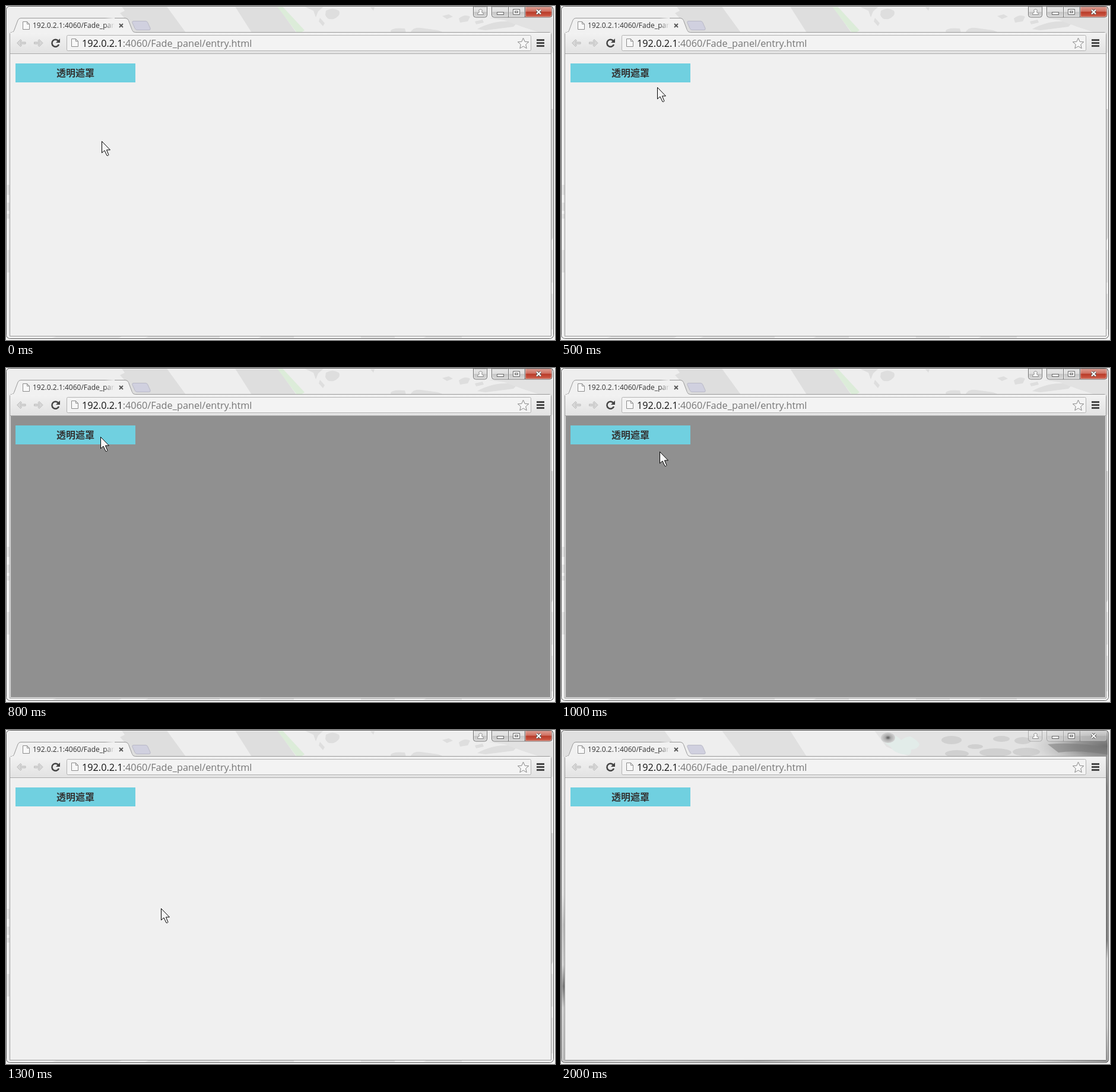
Recreate the animation shown at these times as an HTML page. Size 925 px wide and 564 px high, loop 2600 ms.

```html
<!DOCTYPE html>
<html lang="zh">
<head>
<meta charset="utf-8">
<title>透明遮罩</title>
<style>
  html, body { margin: 0; width: 100%; height: 100%; overflow: hidden; background: #f4f4f4; }
  svg { display: block; width: 100%; height: 100%; }
  text { font-family: "Open Sans", "Noto Sans", sans-serif; }
  .label { font: bold 16px "Noto Sans CJK SC", "Noto Sans CJK", sans-serif; }
  .line { fill: none; }
</style>
</head>
<body>
<svg viewBox="0 0 925 564" preserveAspectRatio="none">
  <defs>
    <clipPath id="window"><rect width="923" height="562" rx="6"/></clipPath>
    <linearGradient id="toolbar" x2="0" y2="1">
      <stop stop-color="#f2f2f2"/><stop offset="1" stop-color="#e2e2e2"/>
    </linearGradient>
    <linearGradient id="glass" x2="0" y2="1">
      <stop stop-color="#e8e8e8"/><stop offset=".48" stop-color="#dedede"/>
      <stop offset=".5" stop-color="#c4c4c4"/><stop offset="1" stop-color="#dadada"/>
    </linearGradient>
    <linearGradient id="red" x2="0" y2="1">
      <stop stop-color="#dfa095"/><stop offset=".46" stop-color="#cf6f60"/>
      <stop offset=".5" stop-color="#b83a28"/><stop offset="1" stop-color="#d0604c"/>
    </linearGradient>
    <linearGradient id="tabFade">
      <stop offset=".88" stop-color="#f1f1f1" stop-opacity="0"/><stop offset="1" stop-color="#f1f1f1"/>
    </linearGradient>
    <linearGradient id="rightEdge" x2="0" y2="1">
      <stop stop-color="#999"/><stop offset=".1" stop-color="#6a6a6a"/>
      <stop offset=".6" stop-color="#666"/><stop offset=".66" stop-color="#ccc"/>
      <stop offset=".88" stop-color="#c4c4c4"/><stop offset="1" stop-color="#888"/>
    </linearGradient>
    <linearGradient id="leftEdge" x2="0" y2="1">
      <stop stop-color="#e6e6e6"/><stop offset=".45" stop-color="#dedede"/>
      <stop offset=".55" stop-color="#bbb"/><stop offset=".68" stop-color="#ccc"/>
      <stop offset=".75" stop-color="#777"/><stop offset=".82" stop-color="#ccc"/>
      <stop offset="1" stop-color="#bbb"/>
    </linearGradient>
    <linearGradient id="bottomEdge">
      <stop stop-color="#bbb"/><stop offset=".12" stop-color="#d8d8d8"/>
      <stop offset=".36" stop-color="#999"/><stop offset=".5" stop-color="#ccc"/>
      <stop offset=".86" stop-color="#d0d0d0"/><stop offset="1" stop-color="#777"/>
    </linearGradient>
    <radialGradient id="corner" cx="1" cy=".6" r="1">
      <stop stop-color="#6c6c6c"/><stop offset=".4" stop-color="#999"/>
      <stop offset="1" stop-color="#ccc" stop-opacity="0"/>
    </radialGradient>
    <radialGradient id="spot">
      <stop stop-color="#555"/><stop offset=".4" stop-color="#aaa"/><stop offset="1" stop-color="#d4d4d4"/>
    </radialGradient>
  </defs>

  <g clip-path="url(#window)">
    <rect width="925" height="564" fill="#eee"/>
    <g id="activeFrame" fill="#dedede">
      <path d="M195 1H271L303 45H216L205 26 192 12 200 8ZM386 1H458L489 45H414Z"/>
      <path d="M457 1H466L503 41 497 45H490Z" fill="#dcecd9"/>
      <path d="M539 8Q550 1 561 8 565 16 552 22 541 24 538 15ZM503 1H535L526 9 522 19 518 8ZM529 20l8 9-3 5-7-8ZM614 2h7l-2 6Z"/>
      <path d="M648 42q3-6 24-4l2 7h-25ZM682 44q4-9 17-7l29 4 10 4ZM735 17l11-3 7 4-10 4ZM763 21q10-8 19-3l-4 8-13 2ZM790 26l13-3 2 5-13 3ZM794 39q30-17 69-12l-8 8-47 6Z"/>
      <path d="M812 20H924V45H900Q870 36 840 24Z" fill="#e2e2e2"/>
      <path d="M1 302h6v17h-6ZM1 332h6v14h-6ZM1 351h6v8h-6ZM1 412h6v38h-6ZM918 45h5v34h-5Z"/>
      <path d="M918 174h5V388l-5 10Z" fill="#d0d0d0"/>
      <path d="M918 412h5v55h-5ZM918 486h5v60h-5ZM85 558h110l-10 5H70ZM240 558h120v5H228ZM430 558h55v5h-65ZM598 558h57v5h-57ZM708 558h60v5h-70Z"/>
    </g>
    <g id="inactiveFrame" visibility="hidden">
      <path d="M1 1H174L206 45H1ZM271 1H386L414 45H303Z" fill="#e0e0e0"/>
      <path d="M528 1H925V45H588L548 28Z" fill="#e3e3e3"/>
      <path d="M540 17q8-8 17-10 10 3 16 10 10-7 16-6 14 8 15 14-4 8-14 8 0 8-4 9-10 0-17-3-10-3-13-10Z" fill="#e2ece9"/>
      <ellipse cx="551" cy="13" rx="12" ry="9" fill="url(#spot)"/>
      <g fill="#d0d0d0">
        <ellipse cx="658" cy="17" rx="17" ry="7"/>
        <ellipse cx="667" cy="40" rx="20" ry="6"/>
        <ellipse cx="698" cy="28" rx="13" ry="4"/>
        <ellipse cx="732" cy="38" rx="27" ry="7"/>
        <ellipse cx="742" cy="15" rx="14" ry="5"/>
        <ellipse cx="778" cy="18" rx="14" ry="6"/>
        <ellipse cx="784" cy="37" rx="23" ry="7"/>
      </g>
      <rect x="780" y="1" width="144" height="44" fill="url(#corner)"/>
      <path d="M820 24Q870 20 923 30V42Q872 33 838 38Z" fill="#777" opacity=".5"/>
      <rect x="1" y="45" width="6" height="517" fill="url(#leftEdge)"/>
      <rect x="918" y="45" width="5" height="517" fill="url(#rightEdge)"/>
      <rect x="1" y="558" width="922" height="4" fill="url(#bottomEdge)"/>
    </g>
  </g>
  <rect class="line" x=".5" y=".5" width="922" height="561" rx="6" stroke="#555"/>
  <rect class="line" x="1.5" y="1.5" width="920" height="559" rx="5" stroke="#fff" opacity=".65"/>

  <!-- Window buttons -->
  <g id="windowButtons" stroke="#6e6e6e">
    <path d="M787.5 1V15q0 4 4 4h15q4 0 4-4V1Z" fill="url(#glass)"/>
    <path d="M818.5 1V15q0 4 4 4H874V1ZM846.5 1V19" fill="url(#glass)"/>
    <path id="closeButton" d="M874.5 1V19H916q4 0 4-4V1Z" fill="url(#red)"/>
    <path class="line" d="M788.5 1V15q0 3 3 3h15q3 0 3-3V1M819.5 1V15q0 3 3 3H845.5V1M847.500 1V18H873.500V1M875.500 1V18H916q3 0 3-3V1" stroke="#fff" opacity=".45"/>
  </g>
  <g fill="#fff" stroke="#666">
    <path d="M794.5 14.5q0-4 3-4-2-5 2-5t2 5q3 0 3 4Z" stroke="#888"/>
    <rect x="827.5" y="10.5" width="11" height="4"/>
    <path d="M854.5 5.5h11v9h-11ZM857.5 8.5v3h5v-3Z" fill-rule="evenodd"/>
  </g>
  <path d="M894 6.500l7 7m0-7l-7 7" stroke="#555" stroke-width="4"/>
  <path d="M894 6.500l7 7m0-7l-7 7" stroke="#fff" stroke-width="2.200"/>

  <!-- Tabs and toolbar -->
  <path d="M215 25.500h20q3 0 4 3l4 9q1 3-2 3h-20q-3 0-4-3l-4-9q-1-3 2-3Z" fill="#d0d0df" stroke="#b9b9c6"/>
  <path d="M6.500 557.500V47q0-2.500 3-2.500 3 0 4-3L20 24q1.500-3.500 5-3.500H201q4 0 5.500 4l6 16q1.500 4 5 4H915q3.500 0 3.500 3V557.500Z" fill="#f1f1f1" stroke="#999"/>
  <rect x="7" y="45" width="911" height="36" fill="url(#toolbar)"/>
  <path d="M10 45H215" stroke="#f1f1f1" stroke-width="2"/>
  <path d="M7 80.500H918" stroke="#aaa"/>
  <g fill="#f8f8f8" stroke="#8c8c8c">
    <path id="pageIcon" d="M28.500 26.500h7l4 4v9h-11ZM35.500 26.500v4h4"/>
  </g>
  <svg x="45" y="20" width="138" height="24">
    <text y="17" font-size="12" fill="#333">192.0.2.1:4060/Fade_panel</text>
    <rect width="138" height="24" fill="url(#tabFade)"/>
  </svg>
  <path d="M191 30l6 6m0-6l-6 6" stroke="#555" stroke-width="1.800"/>

  <g class="line" stroke="#bdbdbd">
    <path id="arrow" d="M18.500 62.500l6-6 2 2-2.500 2.500h9v3h-9l2.500 2.500-2 2Z" fill="#d6d6d6"/>
    <use href="#arrow" transform="translate(80.500) scale(-1 1)"/>
  </g>
  <path class="line" d="M88.500 59.500A6 6 0 1 0 89 65" stroke="#444" stroke-width="2.500"/>
  <path d="M91 55v7h-7Z" fill="#444"/>
  <rect x="102.500" y="49.500" width="782" height="26" rx="2" fill="#f3f3f3" stroke="#b3b3b3"/>
  <use href="#pageIcon" x="82" y="29" fill="#f8f8f8" stroke="#8c8c8c"/>
  <text x="128" y="69" font-size="16.250" fill="#777"><tspan fill="#111">192.0.2.1</tspan>:4060/Fade_panel/entry.html</text>
  <path d="M871.500 54l2.600 6.200 6.600.500-5 4.300 1.500 6.500-5.700-3.500-5.700 3.500 1.500-6.500-5-4.300 6.600-.500Z" fill="#f8f8f8" stroke="#888"/>
  <path d="M894 57.500h13m-13 5h13m-13 5h13" stroke="#444" stroke-width="3"/>

  <!-- Page -->
  <rect x="8" y="81" width="910" height="476" fill="#f0f0f0"/>
  <rect id="mask" x="8" y="81" width="909" height="475" opacity=".4" visibility="hidden"/>
  <rect x="16" y="97" width="202" height="32" fill="#70d0e0"/>
  <text class="label" x="117" y="119" text-anchor="middle" fill="#333">透明遮罩</text>
  <path id="cursor" d="M.5.5V20L5 16 9 24.500Q11 25.500 12 23.500L8.500 15H14.500Z" fill="#f5f5f5" stroke="#000"/>
</svg>
<script>
  const LOOP = 2600, STEP = 100;
  // Pointer stops: time, x, y
  const pointerPath = [
    [0, 161, 228], [300, 163, 177], [500, 162, 137], [600, 160, 129], [800, 159, 116],
    [900, 161, 124], [1000, 166, 141], [1100, 183, 179], [1200, 200, 205], [1500, 384, 494]
  ];
  const byId = id => document.getElementById(id);
  const show = (id, visible) => byId(id).setAttribute("visibility", visible ? "visible" : "hidden");

  function pointerAt(time) {
    const next = pointerPath.findIndex(stop => stop[0] > time);
    if (next < 0) return pointerPath.at(-1).slice(1);
    const [t0, x0, y0] = pointerPath[next - 1];
    const [t1, x1, y1] = pointerPath[next];
    const k = (time - t0) / (t1 - t0);
    return [x0 + (x1 - x0) * k, y0 + (y1 - y0) * k].map(Math.round);
  }

  function draw(now) {
    const time = Math.floor(now % LOOP / STEP) * STEP;
    const active = time < 2000;
    show("activeFrame", active);
    show("inactiveFrame", !active);
    byId("closeButton").setAttribute("fill", active ? "url(#red)" : "url(#glass)");
    byId("windowButtons").setAttribute("opacity", active ? 1 : 0.5);
    show("mask", time >= 600 && time < 1100);
    show("cursor", time < 1600);
    byId("cursor").setAttribute("transform", `translate(${pointerAt(time)})`);
  }

  const start = performance.now();
  function tick() {
    draw(performance.now() - start);
    requestAnimationFrame(tick);
  }
  tick();
</script>
</body>
</html>
```
